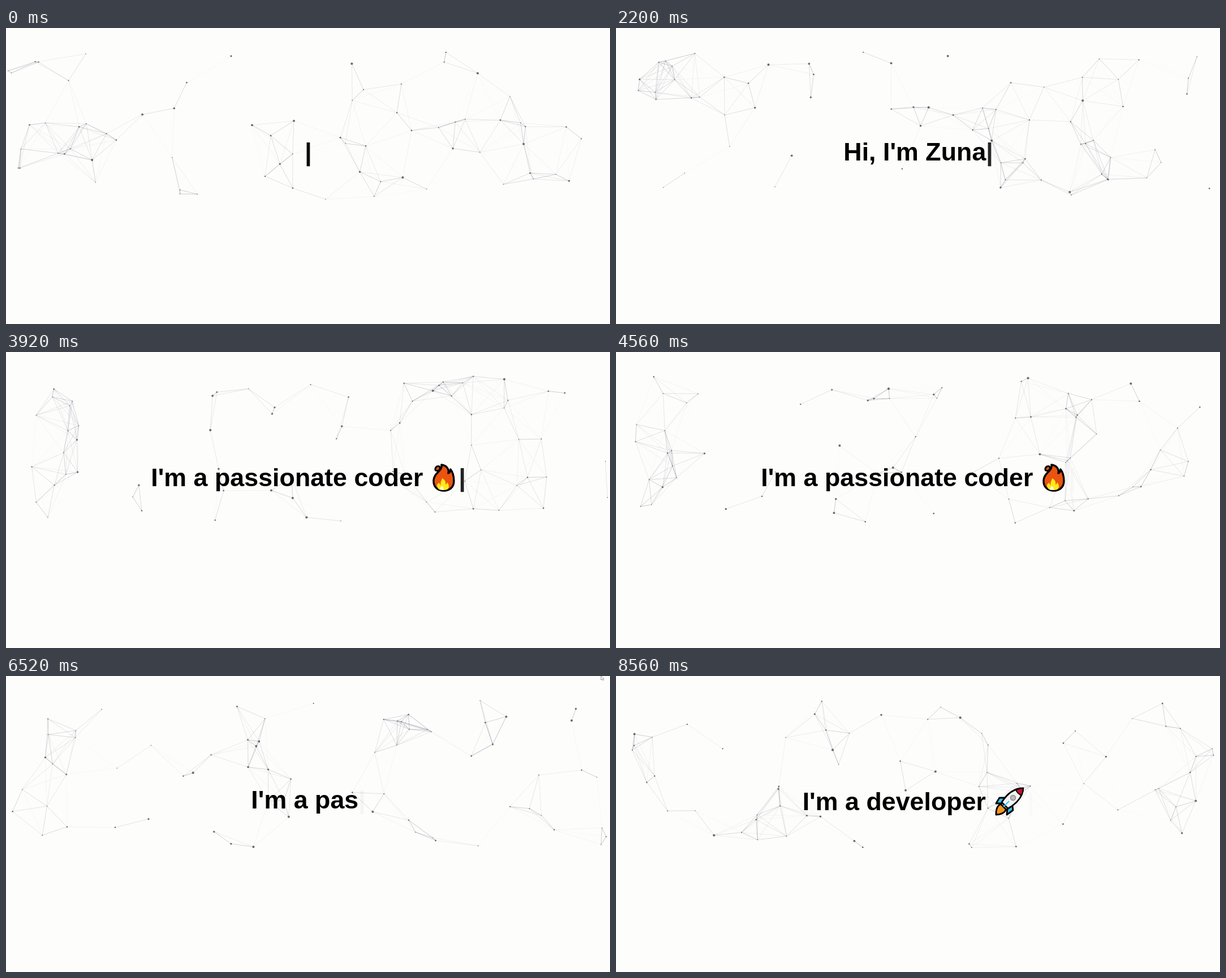
Write an HTML page with a canvas that moves like this. It is 1068x525 px and loops after 8.6 s.

```html
<!DOCTYPE html>
<html lang="en">
<head>
<meta charset="utf-8">
<title>Typed greeting</title>
<style>
  html, body { margin: 0; width: 100%; height: 100%; overflow: hidden; background: #fdfdfc; }
  canvas { position: absolute; left: 0; top: 0; }
  #line {
    position: absolute; left: .6px; top: 189px; width: 1068px;
    text-align: center; white-space: pre; color: #000;
    font: bold 44.8px/60px "Liberation Sans", Arial, sans-serif;
  }
  #line.tall { top: 192px; }
  .emoji { display: none; position: relative; height: 0; }
  .emoji svg { position: absolute; left: 0; top: -42px; overflow: visible; }
  #pointer { position: absolute; left: 1050px; top: 0; }
</style>
</head>
<body>
<canvas id="net" width="1068" height="525"></canvas>
<div id="line"><span id="text"></span><span class="emoji" style="width:55.5px"><svg width="56" height="56" fill="none" stroke-linecap="round" stroke-linejoin="round">
  <defs>
    <path id="arcs" d="M28 4Q38 4 41 14M27 9Q33 9 36 15M4 31Q5 44 16 46M9 32Q10 39 17 41"/>
    <path id="hand" d="M34 26L20 12M30 29L13 15M28 34L9 21M29 39L9 29M39 33L42 15"/>
  </defs>
  <use href="#arcs" stroke="#000" stroke-width="6"/>
  <use href="#arcs" stroke="#35c1f1" stroke-width="2.2"/>
  <use href="#hand" stroke="#000" stroke-width="13"/>
  <ellipse cx="33" cy="36" rx="15.5" ry="15" fill="#000"/>
  <use href="#hand" stroke="#fcc233" stroke-width="8.5"/>
  <ellipse cx="33" cy="36" rx="12.8" ry="12.3" fill="#fcc233"/>
  <path d="M27 24L16 14M24 29L11 18M22 33L10 25M40 25Q32 29 36 38" stroke="#c98a17" stroke-width="1.4"/>
</svg></span><span class="emoji" style="width:50.5px"><svg width="56" height="56" stroke-linejoin="round">
  <path d="M20 4C29 5 34 12 32 19C35 18 36 15 36 12C41 18 42 24 42 33C42 44 34 50 24 50C13 50 6 43 6 33C6 26 9 22 13 18C17 14 21 11 20 4Z" fill="#ea5410" stroke="#000" stroke-width="3.4"/>
  <path d="M12 7C17 5 18 9 17 12C15 16 9 15 9 12Q9 9 12 7Z" fill="#ea5410" stroke="#000" stroke-width="3"/>
  <path d="M16 48C10 43 12 37 16 36Q17 39 19 40C17 34 21 32 21 28C27 31 28 35 27 39Q30 38 30 35C34 40 34 45 30 48Q23 50 16 48Z" fill="#ffe81a"/>
  <path d="M18 48Q17 44 21 42Q25 45 23 48Z" fill="#fff"/>
</svg></span><span class="emoji" style="width:60.5px"><svg width="60" height="56" stroke="#000" stroke-width="2.8" stroke-linejoin="round">
  <path d="M14 31C7 35 6 42 6 50C13 50 20 48 24 41Z" fill="#f7941d"/>
  <path d="M22 20L12 20L6 30L16 30ZM35 34L36 42L25 50L26 40Z" fill="#31c3f2"/>
  <path d="M54 3C38 3 26 12 16 28L27 39C43 30 53 18 54 3Z" fill="#f3f3f3"/>
  <path d="M54 3C49 3 45 4 41 6C43 11 47 14 51 16C53 12 54 7 54 3Z" fill="#c50f2d" stroke-width="2"/>
  <circle cx="36" cy="20" r="4.5" fill="#bdbdbd" stroke="#888" stroke-width="1.4"/>
  <path d="M19 36L29 26" stroke="#31c3f2" stroke-width="2"/>
</svg></span><span id="caret">|</span></div>
<svg id="pointer" width="10" height="10"><path d="M2 0V7L4 5.4L5.3 8L6.6 7.3L5.4 5H7.5Z" fill="#fff" stroke="#888" stroke-width=".8"/></svg>
<script>
const LOOP = 8600, TYPE = 33, ERASE = 75, HOLD = 1450, GAP = 45;
const COUNT = 70, LINK = 100, SPEED = 90;
const AREA = { x: 3, y: 42, w: 1061, h: 263 };
const $ = id => document.getElementById(id);

// Each phrase ends with one emoji, which counts as one more character.
let clock = 0;
const phrases = ["Hi, I'm Zunay ", "I'm a passionate coder ", "I'm a developer "].map(text => {
  const full = text.length + 1, start = clock;
  const erase = start + full * TYPE + HOLD;
  clock = erase + full * ERASE + GAP;
  return { text, full, start, erase };
});

let seed = 77;
const random = () => (seed = seed * 16807 % 2147483647) / 2147483647;
const speed = () => (random() * 2 - 1) * SPEED;
const wrap = (v, size) => (v % size + size) % size;

const dots = Array.from({ length: COUNT }, () => ({
  x: random() * AREA.w, y: random() * AREA.h,
  vx: speed(), vy: speed(),
  r: 0.7 + 1.4 * random() ** 2
}));

const ctx = $("net").getContext("2d");
ctx.beginPath();
ctx.rect(AREA.x, AREA.y, AREA.w, AREA.h);
ctx.clip();

function drawNet(t) {
  const s = t / 1000;
  const now = dots.map(d => ({
    x: AREA.x + wrap(d.x + d.vx * s, AREA.w),
    y: AREA.y + wrap(d.y + d.vy * s, AREA.h),
    r: d.r
  }));
  ctx.clearRect(0, 0, 1068, 525);
  ctx.lineWidth = 0.9;
  now.forEach((a, i) => {
    for (const b of now.slice(i + 1)) {
      const d = Math.hypot(a.x - b.x, a.y - b.y);
      if (d >= LINK) continue;
      ctx.strokeStyle = `rgba(90,90,115,${0.45 * (1 - d / LINK)})`;
      ctx.beginPath();
      ctx.moveTo(a.x, a.y);
      ctx.lineTo(b.x, b.y);
      ctx.stroke();
    }
  });
  ctx.fillStyle = "#6a6a6a";
  for (const d of now) {
    ctx.beginPath();
    ctx.arc(d.x, d.y, d.r, 0, 7);
    ctx.fill();
  }
}

const emojis = document.querySelectorAll(".emoji");

function drawText(t) {
  const k = phrases.findLastIndex(p => t >= p.start);
  const { text, full, start, erase } = phrases[k];
  const typed = Math.min(full, Math.floor((t - start) / TYPE));
  const erased = Math.max(0, Math.floor((t - erase) / ERASE));
  const count = Math.max(0, typed - erased);
  $("text").textContent = text.slice(0, count);
  emojis.forEach((e, i) => {
    e.style.display = i === k && count === full ? "inline-block" : "none";
  });
  $("line").className = count === full ? "tall" : "";
}

const blink = $("caret").animate(
  [0, 1, 0].map(opacity => ({ opacity, easing: "ease" })),
  { duration: 1000, iterations: Infinity }
);
blink.pause();

const begin = performance.now();
function frame() {
  const t = (performance.now() - begin) % LOOP;
  drawNet(t);
  drawText(t);
  blink.currentTime = t + 365;
  $("pointer").style.display = t > 5400 && t < 7400 ? "block" : "none";
  requestAnimationFrame(frame);
}
frame();
</script>
</body>
</html>
```
